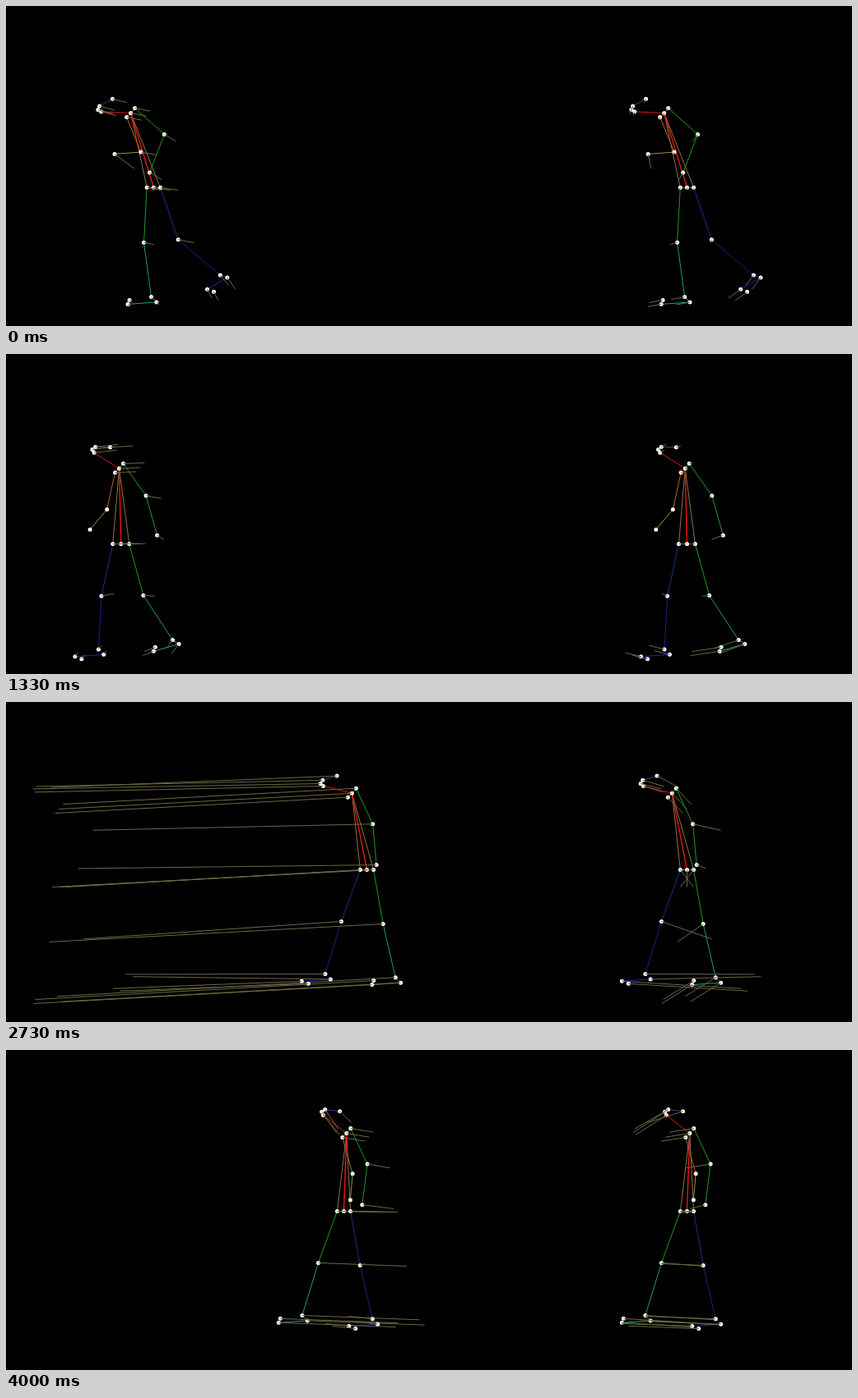
An HTML page with a canvas that plays this animation: 1028x390 px, repeating every 4.07 s.

```html
<!DOCTYPE html>
<html lang="en">
<head>
<meta charset="utf-8">
<title>Walking skeleton</title>
<style>
html, body { margin: 0; height: 100%; overflow: hidden; background: #000; }
canvas { display: block; }
</style>
</head>
<body>
<canvas id="stage" width="1028" height="390"></canvas>
<script>
const ctx = document.getElementById('stage').getContext('2d');
const LOOP = 4070, STEP = 1000 / 15, CENTER = 827;

// Each walk runs from one step to another; phase counts gait cycles.
const walks = [
  { steps: [-1, 7], x: [199, 109], y: [224, 215], lean: [18, 10], phase: [.14, .4], ease: .72 },
  { steps: [8, 14], x: [405, 325], y: [219, 221], lean: [6, 4], phase: [.13, .58], ease: 1 },
  { steps: [15, 22], x: [250, 95], y: [226, 232], lean: [-10, 6], phase: [0, .85], ease: 1 },
  { steps: [23, 40], x: [448, 64], y: [204, 225], lean: [7, 0], phase: [.31, 2.2], ease: 1.6 },
  { steps: [41, 58], x: [438, 66], y: [204, 256], lean: [11, 20], phase: [.5, 2.54], ease: 1 },
  { steps: [59, 60], x: [467, 410], y: [197, 196], lean: [16, -2], phase: [.5, 1], ease: 1 }
];

// Forward angles in degrees over one gait cycle, starting at heel strike.
const THIGH = [20, 13, 3, -5, -9, -10, -15, -19, 2, 24];
const SHANK = [17, 4, -8, -9, -10, -13, -32, -50, -35, -5];

const LIMBS = [
  ['ear eyeL', '#503090'], ['eyeR nose', '#b02848'], ['nose neck', '#d81818'],
  ['neck armL', '#2c9c10'], ['armL elbowL', '#1a9c20'], ['elbowL wristL', '#1a9c28'],
  ['neck armR', '#e05010'], ['armR elbowR', '#b86420'], ['elbowR wristR', '#a49428'],
  ['neck hipR', '#8c7448'], ['neck hipL', '#8c7448'], ['neck pelvis', '#f01010', 1.4],
  ['pelvis hipR', '#d02828'], ['pelvis hipL', '#985050'],
  ['hipR kneeR', '#1a9c20'], ['kneeR ankleR', '#209c70'],
  ['ankleR heelR', '#209c88'], ['heelR toeR', '#209c88'],
  ['hipL kneeL', '#18308c'], ['kneeL ankleL', '#241c8c'],
  ['ankleL heelL', '#28209c'], ['heelL toeL', '#2c24b0']
].map(([ends, ...style]) => [...ends.split(' '), ...style]);

const mix = ([a, b], k) => a + (b - a) * k;
const wave = cycles => Math.cos(2 * Math.PI * cycles);
const shift = ([x, y], dx, dy) => [x + dx, y + dy];

// 0 degrees points straight down, 90 forward (to the left).
function bone([x, y], degrees, length) {
  const angle = degrees * Math.PI / 180;
  return [x - length * Math.sin(angle), y + length * Math.cos(angle)];
}

function gaitAngle(angles, phase) {
  const n = angles.length, pos = (phase % 1) * n, i = Math.floor(pos);
  return mix([angles[i], angles[(i + 1) % n]], pos - i);
}

function addLeg(joints, side, phase, size) {
  const hip = shift(joints.pelvis, -10 * wave(phase - .1), 0);
  const shank = gaitAngle(SHANK, phase);
  const tilt = 4 + .9 * Math.max(0, -shank - 20);
  const knee = bone(hip, gaitAngle(THIGH, phase), 67 * size);
  const ankle = bone(knee, shank, 67 * size);
  const heel = bone(ankle, -tilt - 41, 9);
  const toe = bone(heel, 90 - tilt, 36 - tilt / 4);
  const smallToe = side === 'R' ? shift(toe, 2, -5) : shift(toe, 8, 3);
  Object.entries({ hip, knee, ankle, heel, toe, smallToe })
    .forEach(([name, point]) => joints[name + side] = point);
}

// Joint positions relative to the walker's x.
function bodyAt(step) {
  const walk = walks.findLast(w => w.steps[0] <= step);
  const [from, to] = walk.steps;
  const k = (step - from) / (to - from), eased = k ** walk.ease;
  const phase = mix(walk.phase, eased), lean = mix(walk.lean, k);
  const y = mix(walk.y, Math.sqrt(k));
  const size = 1 - .005 * Math.max(0, y - 225);

  const joints = { pelvis: [0, y] };
  const neck = joints.neck = bone(joints.pelvis, 180 - lean, 95 * size);
  const gaze = 90 + Math.min(38, 35 - 1.9 * lean);
  joints.nose = bone(neck, gaze, 36);
  joints.eyeR = bone(neck, gaze + 3, 40);
  joints.eyeL = bone(neck, gaze + 10, 39);
  joints.ear = bone(neck, gaze + 35, 28);

  joints.armL = shift(neck, 5, -6);
  joints.elbowL = bone(joints.armL, 13 * wave(2 * phase) - 38, 48);
  joints.wristL = bone(joints.elbowL, 1 + 20 * wave(phase - .2), 50);
  joints.armR = shift(neck, -5, 5);
  if (wave(phase) > -.8) { // otherwise hidden behind the body
    joints.elbowR = bone(joints.armR, -5 - 18 * wave(phase - .15), 46);
    joints.wristR = bone(joints.elbowR, 50 - 45 * wave(2 * phase), 32);
  }
  addLeg(joints, 'R', phase, size);
  addLeg(joints, 'L', phase + .5, size);
  return { x: mix(walk.x, eased), joints };
}

function line([x1, y1], [x2, y2], color, width = 1) {
  ctx.strokeStyle = color;
  ctx.lineWidth = width;
  ctx.beginPath();
  ctx.moveTo(x1, y1);
  ctx.lineTo(x2, y2);
  ctx.stroke();
}

function marker([x, y]) {
  ctx.fillStyle = '#fffaf4';
  ctx.beginPath();
  ctx.arc(x, y, 2.5, 0, 7);
  ctx.fill();
}

function drawBody(now, before, x, beforeX) {
  const at = (body, name, rootX) => body.joints[name] && shift(body.joints[name], rootX + .5, .5);
  for (const [a, b, color, width] of LIMBS) {
    if (now.joints[a] && now.joints[b]) line(at(now, a, x), at(now, b, x), color, width);
  }
  for (const name in now.joints) {
    const point = at(now, name, x), past = at(before, name, beforeX);
    marker(point);
    if (past) line(point, past, '#6c6844');
  }
}

function frame(time) {
  const step = Math.min(60, Math.floor((time % LOOP + 4) / STEP));
  const now = bodyAt(step), before = bodyAt(step - 1);
  ctx.fillStyle = '#000';
  ctx.fillRect(0, 0, 1028, 390);
  drawBody(now, before, now.x, before.x);
  drawBody(now, before, CENTER, CENTER);
  requestAnimationFrame(frame);
}
requestAnimationFrame(frame);
</script>
</body>
</html>
```
